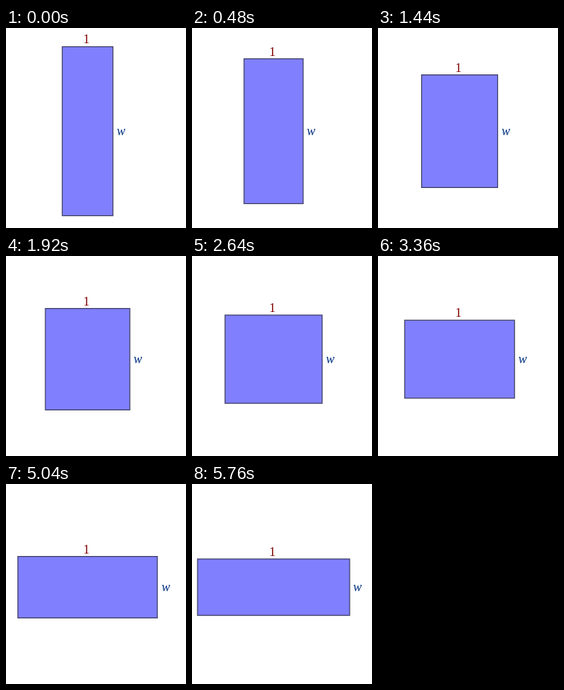
An HTML page with a canvas for the animation above (5880 ms loop, 225 by 250 pixels).

```html
<!DOCTYPE html>
<html lang="en">
<head>
<meta charset="utf-8">
<title>Rectangles of equal area</title>
<style>
  html, body { margin: 0; width: 100%; height: 100%; overflow: hidden; background: #fff; }
  canvas { display: block; }
</style>
</head>
<body>
<canvas id="stage" width="225" height="250"></canvas>
<script>
const ctx = document.getElementById('stage').getContext('2d', { alpha: false });
const STEP = 120, STEPS = 49;      // ms per step, steps per loop
const UNIT = 21.12, AREA = 30;     // pixels per unit, constant area
const CX = 102, CY = 129;

function label(text, x, y, style, color) {
  ctx.font = `${style} 16px "Liberation Serif", "Times New Roman", serif`;
  ctx.fillStyle = color;
  ctx.fillText(text, x, y);
}

function draw(step) {
  const length = 3 + step / 8;
  const w = length * UNIT, h = AREA / length * UNIT;
  const left = CX - w / 2, right = CX + w / 2, top = CY - h / 2;

  ctx.fillStyle = '#fff';
  ctx.fillRect(0, 0, 225, 250);
  ctx.fillStyle = '#8080ff';
  ctx.fillRect(left, top, w, h);
  ctx.strokeStyle = '#404068';
  ctx.lineWidth = 1.2;
  ctx.strokeRect(left, top, w, h);

  // Labels sit on whole pixels beside the moving edges
  label('1', 96.5, Math.floor(top - 14.4) + 11, 'normal', '#800000');
  label('w', Math.floor(right + 15.95) - 10.5, 134, 'italic', '#003080');
}

const start = performance.now();
function tick() {
  const time = Math.max(0, performance.now() - start);
  draw(Math.floor(time / STEP) % STEPS);
  requestAnimationFrame(tick);
}
tick();
</script>
</body>
</html>
```
